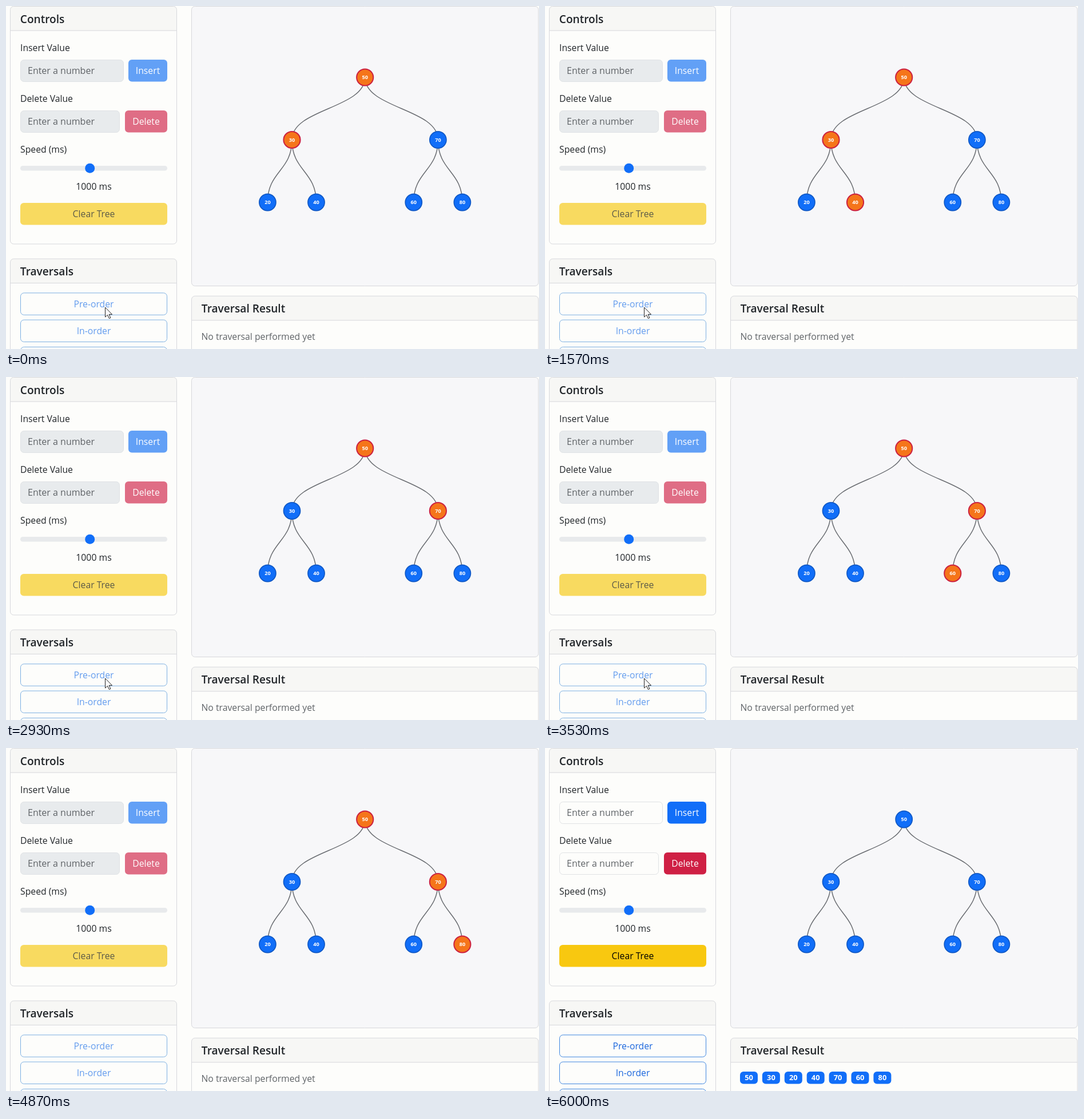
These frames come from a looping animation (932x601 px, 6.03 s). An HTML page with a canvas:

```html
<!DOCTYPE html>
<html lang="en">
<head>
<meta charset="utf-8">
<title>Binary tree traversal</title>
<style>
html, body { margin: 0; width: 100%; height: 100%; overflow: hidden; background: #fdfdfb; }
canvas { display: block; }
</style>
</head>
<body>
<canvas id="stage" width="932" height="601"></canvas>
<script>
const ctx = document.getElementById('stage').getContext('2d');
const LOOP = 6030;
const FIRST_VISIT = 440, STEP = 1010;
const CURSOR_LEAVES = 4100;
const FONT = '"Open Sans", "Noto Sans", sans-serif';
const INK = '#212529', BLUE = '#116ef8', EDGE = '#d7d8dc', PAGE = '#fdfdfb', HEAD = '#f7f7f5';

// value: [x, y, parent]
const tree = {
  50: [627.7, 125, null],
  30: [500, 234.5, 50],
  70: [755.4, 234.5, 50],
  20: [457.4, 344, 30],
  40: [542.5, 344, 30],
  60: [712.8, 344, 70],
  80: [797.9, 344, 70]
};
const order = [50, 30, 20, 40, 70, 60, 80];

function text(str, x, y, { size = 15.75, weight = 400, color = INK, align = 'left' } = {}) {
  ctx.font = `${weight} ${size}px ${FONT}`;
  ctx.fillStyle = color;
  ctx.textAlign = align;
  ctx.fillText(str, x, y);
}

function box(x, y, w, h, r, fill, stroke) {
  ctx.beginPath();
  ctx.roundRect(x, y, w, h, r);
  if (fill) {
    ctx.fillStyle = fill;
    ctx.fill();
  }
  if (stroke) {
    ctx.strokeStyle = stroke;
    ctx.lineWidth = 1;
    ctx.stroke();
  }
}

function disc(x, y, r, fill) {
  ctx.beginPath();
  ctx.arc(x, y, r, 0, Math.PI * 2);
  ctx.fillStyle = fill;
  ctx.fill();
}

function card(x, y, w, h, title) {
  box(x, y, w, h, 6, PAGE);
  box(x, y, w, 43, [6, 6, 0, 0], HEAD);
  ctx.fillStyle = EDGE;
  ctx.fillRect(x, y + 42, w, 1);
  box(x, y, w, h, 6, null, EDGE);
  text(title, x + 17.3, y + 29.2, { size: 19.1, weight: 600 });
}

function button(label, x, y, w, fill, color) {
  box(x, y, w, 38.5, 6, fill);
  text(label, x + w / 2, y + 25, { color, align: 'center' });
}

function outlineButton(label, y, busy) {
  box(25.5, y, 256, 38.5, 6, PAGE, busy ? '#7db0e2' : '#3f86e0');
  text(label, 153.5, y + 25.3, { color: busy ? '#639cee' : '#1a66dd', align: 'center' });
}

function field(y, w, busy) {
  box(25.5, y, w, 38, 6, busy ? '#e8ebed' : PAGE, busy ? '#dfe2e5' : '#e0e2e4');
  text('Enter a number', 38, y + 24.7, { size: 16, color: '#5f6367' });
}

function controls(busy) {
  card(7.5, 0.5, 291, 416.5, 'Controls');
  text('Insert Value', 25, 79);
  field(94.5, 180, busy);
  button('Insert', 214, 94, 68, busy ? '#62a0f6' : BLUE, '#fff');
  text('Delete Value', 25, 168);
  field(183.5, 173, busy);
  button('Delete', 208, 183, 74, busy ? '#df6d85' : '#cf2044', '#fff');
  text('Speed (ms)', 25, 257);
  box(25, 280, 257, 8.5, 4.25, '#e8eaec');
  disc(146.7, 284.2, 8.5, BLUE);
  text('1000 ms', 153.5, 322, { align: 'center' });
  button('Clear Tree', 25, 345, 257, busy ? '#f8da60' : '#f8c810', busy ? '#5b5948' : '#000');
}

function traversals(busy) {
  card(7.5, 443, 291, 180, 'Traversals');
  outlineButton('Pre-order', 502.8, busy);
  outlineButton('In-order', 550, busy);
  outlineButton('Post-order', 597.5, busy);
}

function result(done) {
  card(324.5, 508.2, 606.5, 130, 'Traversal Result');
  if (!done) {
    text('No traversal performed yet', 341.5, 585.3, { color: '#5f6367' });
    return;
  }
  order.forEach((value, i) => {
    const x = 341 + i * 38.9;
    box(x, 567, 31, 21.5, 6, BLUE);
    text(value, x + 15.5, 582.4, { size: 12.9, weight: 700, color: '#fff', align: 'center' });
  });
}

// The visited node and all its ancestors are lit.
function litNodes(step) {
  const lit = new Set();
  for (let v = order[step]; v; v = tree[v][2]) lit.add(v);
  return lit;
}

function drawTree(step) {
  box(324.5, 0.5, 606.5, 490, 6, '#f7f7f9', EDGE);
  ctx.strokeStyle = '#686b70';
  ctx.lineWidth = 1.5;
  for (const value of order) {
    const [x, y, parent] = tree[value];
    if (!parent) continue;
    const [px, py] = tree[parent];
    const mid = (y + py) / 2;
    ctx.beginPath();
    ctx.moveTo(px, py);
    ctx.bezierCurveTo(px, mid, x, mid, x, y);
    ctx.stroke();
  }
  const lit = litNodes(step);
  for (const value of order) {
    const [x, y] = tree[value];
    const on = lit.has(value);
    disc(x, y, 14.6, on ? '#f5751a' : BLUE);
    ctx.strokeStyle = on ? '#cc2040' : '#0f57c4';
    ctx.lineWidth = on ? 2 : 1.6;
    ctx.stroke();
    text(value, x, y + 3.3, { size: 9.2, weight: 700, color: '#fff', align: 'center' });
  }
}

function cursor(x, y) {
  ctx.beginPath();
  ctx.moveTo(x, y);
  for (const [dx, dy] of [[0, 17], [4, 13.3], [6.9, 19.5], [9.4, 18.4], [6.6, 12.3], [12, 12.3]]) {
    ctx.lineTo(x + dx, y + dy);
  }
  ctx.closePath();
  ctx.fillStyle = '#fff';
  ctx.fill();
  ctx.strokeStyle = '#222';
  ctx.lineWidth = 1;
  ctx.stroke();
}

function draw(t) {
  const step = 2 + Math.floor((t - FIRST_VISIT) / STEP);
  const done = step >= order.length;
  ctx.fillStyle = PAGE;
  ctx.fillRect(0, 0, 932, 601);
  controls(!done);
  traversals(!done);
  drawTree(step);
  result(done);
  if (t < CURSOR_LEAVES) cursor(173.5, 528);
}

const start = performance.now();
function frame() {
  draw((performance.now() - start) % LOOP);
  requestAnimationFrame(frame);
}
frame();
</script>
</body>
</html>
```
